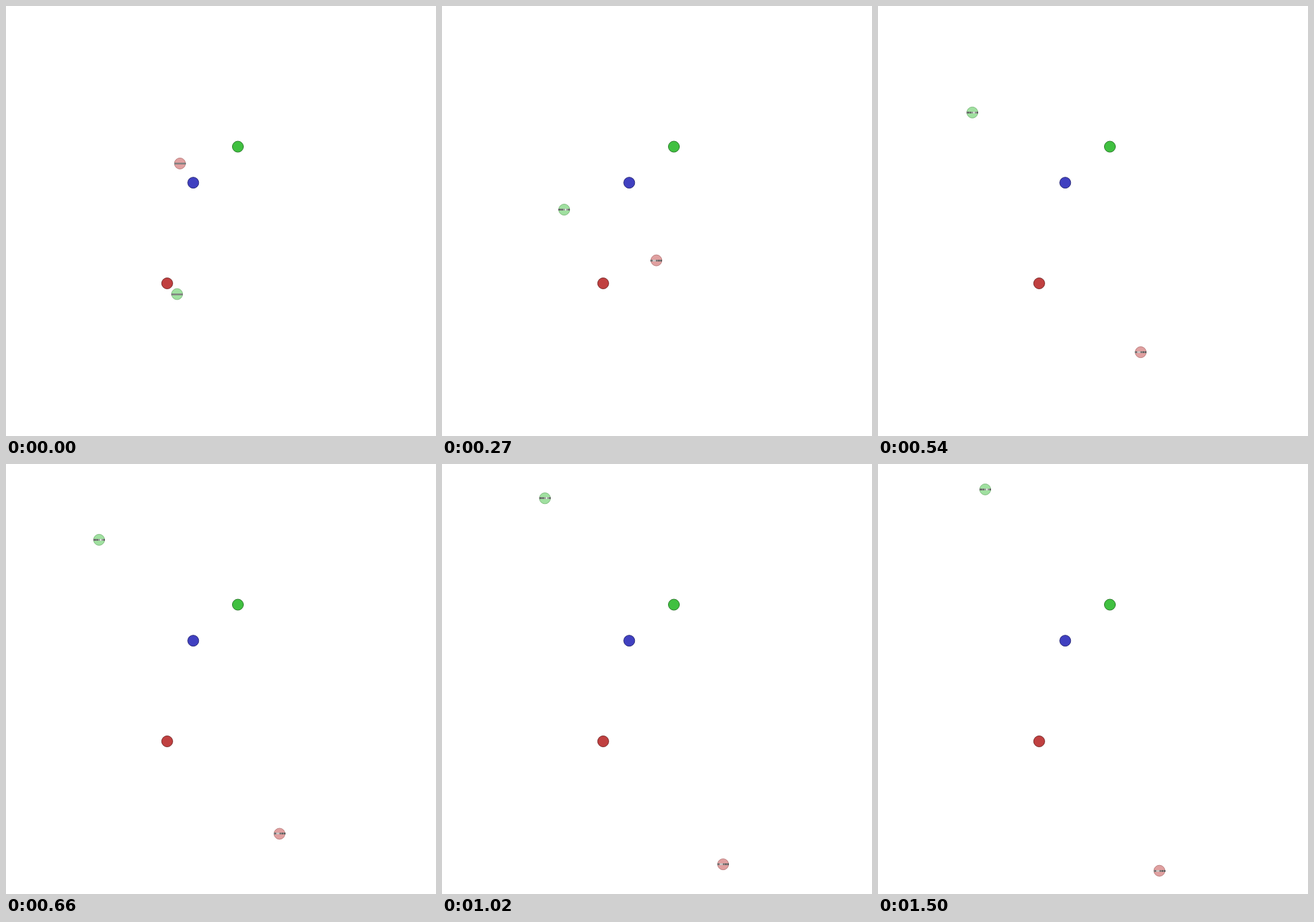
An HTML page with a canvas for the animation above (1530 ms loop, 700 px wide and 700 px high).

```html
<!DOCTYPE html>
<html lang="en">
<head>
<meta charset="utf-8">
<title>Moving agents</title>
<style>
  html, body { margin: 0; overflow: hidden; background: #fff; }
  canvas { display: block; }
</style>
</head>
<body>
<canvas id="stage" width="700" height="700"></canvas>
<script>
const ctx = document.getElementById('stage').getContext('2d');
const STEP = 30, STEPS = 51;
const DAMPING = 0.1438, SWING = 0.045; // per step
const CELLS = 10, BAR = 19;

const landmarks = [
  { x: 377.5, y: 229, fill: '#40c040', edge: '#267326' },
  { x: 304.8, y: 287.7, fill: '#4040c0', edge: '#262673' },
  { x: 262.4, y: 451.5, fill: '#c04040', edge: '#732626' },
];

// path: Bezier control points; peak: brightest cell of the signal bar
const agents = [
  {
    fill: '#e0a0a0', edge: '#b97c7c', peak: 3,
    path: [[283.2, 256.4], [349.1, 356.5], [315.6, 449.7], [458.1, 547.8], [458.1, 662.8]],
  },
  {
    fill: '#a0e0a0', edge: '#7cb97c', peak: 6,
    path: [[278.5, 469], [165.7, 358.4], [253.6, 336.6], [89.7, 198.4], [175, 40.5]],
  },
];

// Damped spring released from rest: 0 at the start, settling at 1
function spring(n) {
  const a = SWING * n;
  return 1 - Math.exp(-DAMPING * n) * (Math.cos(a) + DAMPING / SWING * Math.sin(a));
}

function bezier(points, u) {
  while (points.length > 1) {
    points = points.slice(1).map((p, i) => p.map((v, k) => points[i][k] * (1 - u) + v * u));
  }
  return points[0];
}

function disc(x, y, { fill, edge }) {
  ctx.beginPath();
  ctx.arc(x, y, 9, 0, 2 * Math.PI);
  ctx.fillStyle = fill;
  ctx.fill();
  ctx.strokeStyle = edge;
  ctx.stroke();
}

function signalBar(x, y, peak, active) {
  const left = Math.round(x - BAR / 2), top = Math.round(y - 1.5), width = BAR / CELLS;
  for (let i = 0; i < CELLS; i++) {
    const ripple = 0.08 * (-1) ** i;
    const shade = active ? 0.42 + ripple + 0.45 * Math.exp(-((i - peak) ** 2) / 2) : 0.5;
    const grey = Math.round(255 * shade);
    ctx.fillStyle = `rgb(${grey},${grey},${grey})`;
    ctx.fillRect(left + i * width, top, width, 3);
  }
}

function draw(n) {
  ctx.clearRect(0, 0, 700, 700);
  for (const mark of landmarks) disc(mark.x, mark.y, mark);
  for (const agent of agents) {
    const [x, y] = bezier(agent.path, spring(n));
    disc(x, y, agent);
    signalBar(x, y, agent.peak, n > 0);
  }
}

const start = performance.now();
function tick() {
  draw(Math.floor((performance.now() - start) / STEP) % STEPS);
  requestAnimationFrame(tick);
}
tick();
</script>
</body>
</html>
```
